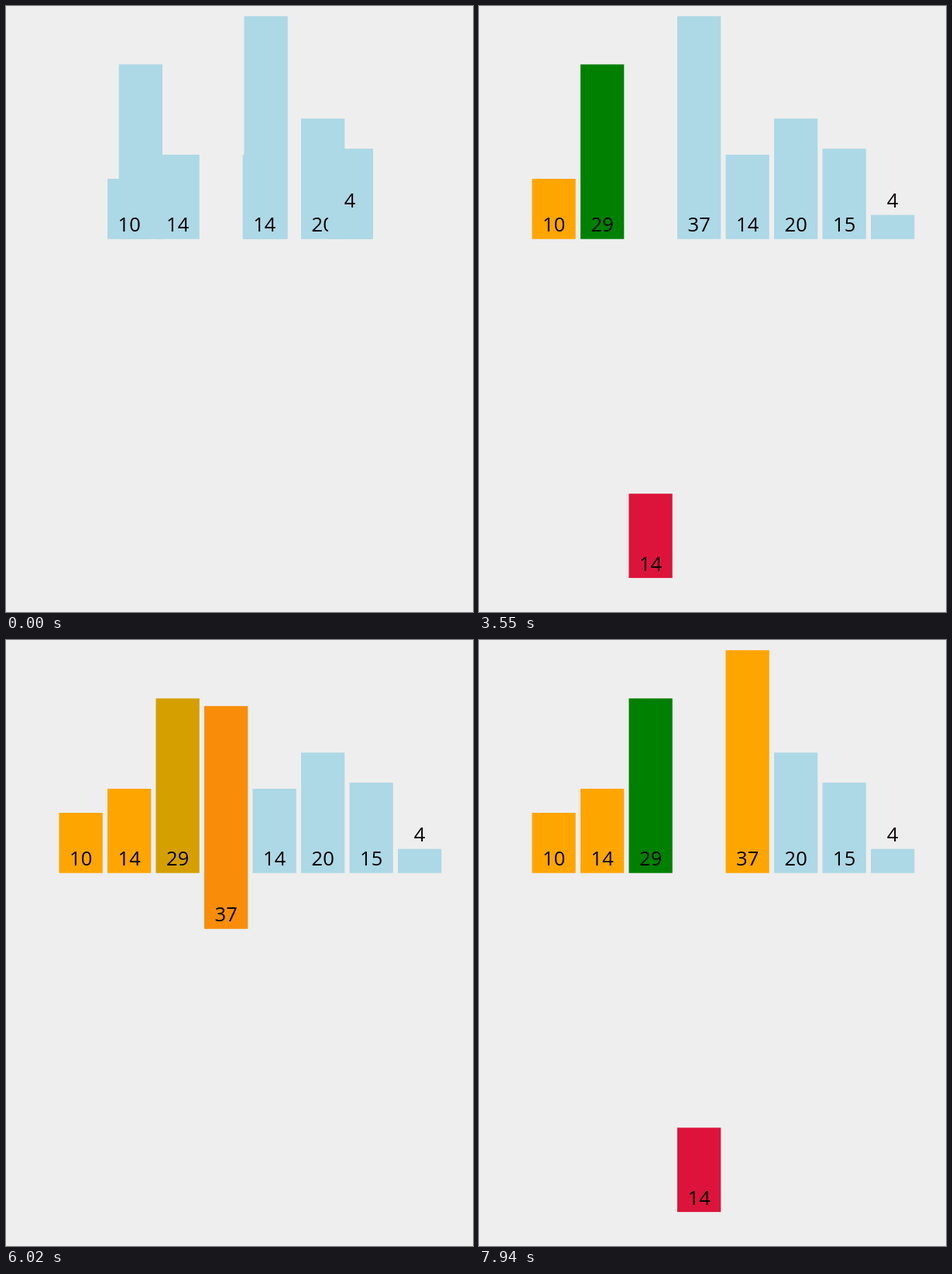
Animation of 603x782 px, one loop 8 s. Source, as an HTML page with a canvas:

```html
<!DOCTYPE html>
<html lang="en">
<head>
<meta charset="utf-8">
<title>Insertion sort</title>
<style>
  html, body { margin: 0; width: 100%; height: 100%; overflow: hidden; background: #eee; }
  canvas { display: block; }
</style>
</head>
<body>
<canvas id="stage" width="603" height="782"></canvas>
<script>
const ctx = document.getElementById('stage').getContext('2d');

const LOOP = 8000;
const TICK = 70;            // the picture advances in steps of this length
const TICK_TIME = 1000 / 15; // animation time passed per step
const DURATION = 250;
const FIRST = 303, PERIOD = 450; // animation time of the sorting steps

const LEFT = 68.5, PITCH = 62.5, WIDTH = 56.25;
const BASE = 300.7, UNIT = 7.77, DROP = 437.4;

const BLUE = [173, 216, 230], RED = [220, 20, 60];
const ORANGE = [255, 165, 0], GREEN = [0, 128, 0];

const values = [29, 10, 14, 37, 14, 20, 15, 4];
const sortedSlots = [6, 1, 2, 7, 3, 5, 4, 0];

const paint = (bar, color) => ({ bar, color });
const drop = bar => ({ bar, color: RED, drop: 1 });
const rise = bar => ({ bar, color: ORANGE, drop: 0 });
const move = (bar, slot) => ({ bar, slot });

// Start time, then the changes that begin there
const steps = [
  [340, paint(0, ORANGE)],
  [810, drop(1)],
  [1290, paint(0, GREEN)],
  [1700, move(0, 1), move(1, 0)],
  [2180, rise(1), paint(0, ORANGE)],
  [2660, drop(2)],
  [3140, paint(0, GREEN)],
  [3550, move(0, 2), move(2, 1)],
  [4030, paint(0, ORANGE), paint(1, GREEN)],
  [4510, rise(2), paint(1, ORANGE)],
  [4990, drop(3)],
  [5470, paint(0, GREEN)],
  [5880, rise(3), paint(0, ORANGE)],
  [6360, drop(4)],
  [6840, paint(3, GREEN)],
  [7320, move(3, 4), move(4, 3)],
  [7730, paint(3, ORANGE), paint(0, GREEN)]
];

const mix = (a, b, p) => a + (b - a) * p;
const easeInOut = u => u < 0.5 ? 4 * u ** 3 : 1 - 4 * (1 - u) ** 3;

function progress(t, start, lead) {
  const elapsed = lead + Math.floor((t - start) / TICK) * TICK_TIME;
  return easeInOut(Math.min(1, elapsed / DURATION));
}

function barsAt(t) {
  const intro = progress(t, 0, 157);
  const bars = values.map((value, i) => ({
    value, slot: mix(sortedSlots[i], i, intro), drop: 0, color: BLUE
  }));
  steps.forEach(([start, ...changes], k) => {
    if (t < start) return;
    const lead = Math.round(start / 68.45) * TICK_TIME - FIRST - PERIOD * k;
    const p = progress(t, start, lead);
    for (const { bar, color, slot, drop } of changes) {
      const b = bars[bar];
      if (color) b.color = b.color.map((c, i) => mix(c, color[i], p));
      if (slot !== undefined) b.slot = mix(b.slot, slot, p);
      if (drop !== undefined) b.drop = mix(b.drop, drop, p);
    }
  });
  return bars;
}

function drawBar({ value, slot, drop, color }) {
  const x = LEFT + PITCH * slot;
  const bottom = BASE + DROP * drop;
  const height = value * UNIT;
  ctx.fillStyle = `rgb(${color.map(Math.round)})`;
  ctx.fillRect(x, bottom - height, WIDTH, height);
  // Short bars carry their label on top
  const foot = height < 40 ? bottom - height : bottom;
  ctx.fillStyle = '#000';
  ctx.fillText(value, x + WIDTH / 2, foot - 9.5);
}

function frame() {
  const t = performance.now() % LOOP;
  ctx.fillStyle = '#eee';
  ctx.fillRect(0, 0, 603, 782);
  ctx.font = '25.5px "Open Sans", "Noto Sans", sans-serif';
  ctx.textAlign = 'center';
  barsAt(t).forEach(drawBar);
  requestAnimationFrame(frame);
}
frame();
</script>
</body>
</html>
```
